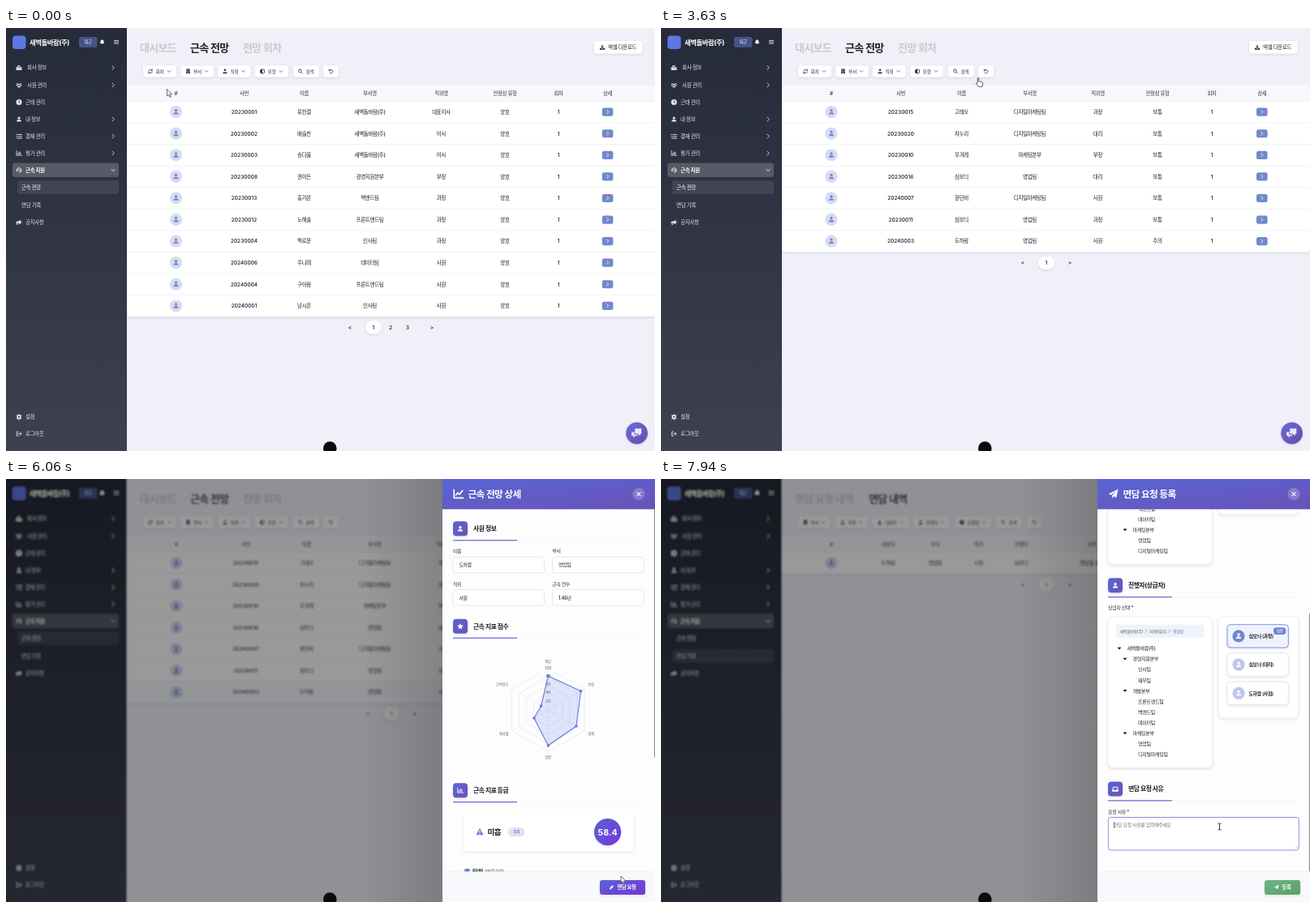
An HTML page for the animation above (8000 ms loop, 800 px wide and 522 px high).

```html
<!DOCTYPE html>
<html lang="ko">
<head>
<meta charset="utf-8">
<title>근속 전망</title>
<style>
html, body { margin: 0; width: 100%; height: 100%; overflow: hidden; background: #f0f0f9; }
svg { display: block; width: 100%; height: 100%; }
text { font-family: Inter, 'Noto Sans CJK KR', 'Noto Sans CJK', sans-serif; white-space: pre; }
</style>
</head>
<body>
<svg id="stage" viewBox="0 0 800 522" xmlns="http://www.w3.org/2000/svg"></svg>
<script>
const LOOP = 8000;
const COMPANY = '새벽돌바람(주)';
const svg = document.getElementById('stage');

// Icons on a 16 x 16 grid; a leading "~" marks a stroked icon.
const ICONS = {
  user: 'M8 1a3.6 3.6 0 1 1 0 7.2A3.6 3.6 0 0 1 8 1ZM1.5 15c0-4 2.500-5.600 6.500-5.600s6.500 1.600 6.500 5.600Z',
  users: 'M8 4a2.500 2.500 0 1 1 0 5 2.500 2.500 0 0 1 0-5ZM3 2a2 2 0 1 1 0 4 2 2 0 0 1 0-4ZM13 2a2 2 0 1 1 0 4 2 2 0 0 1 0-4ZM3.500 14c0-5 9-5 9 0ZM0 10c0-3 3-4 4.500-3v2L3 10ZM16 10c0-3-3-4-4.500-3v2l1.500 1Z',
  building: 'M2 0h12v16H9.500v-4h-3v4H2ZM4.500 3v2h2V3ZM9.500 3v2h2V3ZM4.500 7v2h2V7ZM9.500 7v2h2V7Z',
  city: 'M0 6h4V1h7v6h5v8H0ZM6 3v2h3V3ZM6 7v2h3V7ZM2 9v2h1V9ZM12 10v2h2v-2Z',
  clock: 'M8 0a8 8 0 1 1 0 16A8 8 0 0 1 8 0ZM7 3v6l4 2 1-1.500-3-1.700V3Z',
  list: '~M0 3l2 2 3-3M0 9l2 2 3-3M7 3.500h9M7 9h9M3 14h13',
  chart: '~M1 1v13h15M5 11V8M8.500 11V4M12 11V6',
  line: '~M1 1v13.500h15M4 10l3-4 3 2.500 5-6',
  headset: '~M2 10V8a6 6 0 0 1 12 0v4q0 2-5 2M3 8v4M13 8v4M6 8h4',
  horn: 'M0 5h5l8-4v12l-8-4H4l1 6H2L1 9H0ZM14 5h2v4h-2Z',
  gear: 'M6.500 0h3l.5 2.300 1.500.8 2.200-.8 1.600 2.700L13.500 7v2l1.800 2-1.600 2.700-2.200-.8-1.500.8-.5 2.300h-3L6 13.700l-1.500-.8-2.200.8L.7 11l1.800-2V7L.7 5l1.600-2.700 2.200.8L6 2.300ZM8 5.500a2.500 2.500 0 1 0 0 5 2.500 2.500 0 0 0 0-5Z',
  exit: '~M6 2H2v12h4M5.500 8H14M11 4l4 4-4 4',
  bell: 'M7 0h2v2c4 1 4 4 4 7l2 3H1l2-3c0-3 0-6 4-7ZM6 13h4q-2 4-4 0Z',
  bars: '~M1 3h14M1 8h14M1 13h14',
  down: '~M2 5l6 6 6-6',
  right: '~M5 1l7 7-7 7',
  sync: '~M2 7a6 6 0 0 1 11-2.500M14 1v4h-4M14 9a6 6 0 0 1-11 2.500M2 15v-4h4',
  undo: '~M2 1v5h5M2.500 6A6 6 0 1 1 4 13',
  half: 'M8 0a8 8 0 1 1 0 16A8 8 0 0 1 8 0ZM8 2a6 6 0 0 1 0 12Z',
  tie: 'M8 0a3 3 0 1 1 0 7 3 3 0 0 1 0-7ZM1 15q0-6 5-6l2 4 2-4q5 0 5 6Z',
  search: '~M6.500 1.500a5 5 0 1 1 0 10 5 5 0 0 1 0-10ZM10.500 10.500L15 15',
  download: 'M6.500 0h3v6H13l-5 5-5-5h3.500ZM0 11h4l4 2.500 4-2.500h4v5H0Z',
  plane: 'M16 0L13 14 8.500 11.500 6 15V10.500L13 3 4.500 9.500 0 8Z',
  pen: 'M11 1l4 4-9 9-5 1 1-5ZM10 4l2 2Z',
  star: 'M8 0l2.400 5 5.600.8-4 4 1 5.600L8 12.800 3 15.400l1-5.600-4-4L5.600 5Z',
  tray: 'M2 2h12l2 7v6H0V9ZM3.500 4L2 9h3l1 2h4l1-2h3l-1.500-5Z',
  warn: 'M8 0l8 15H0ZM7 5v5h2V5ZM7 11.500v2h2v-2Z',
  trophy: 'M4 0h8v2h4q0 6-5 7l-2 2v2h3v3H4v-3h3v-2L5 9Q0 8 0 2h4Z',
  chat: 'M5 1h10v8h-2v3l-4-3H5ZM0 6h4v4h4l2 2H6l-3 3v-3H0Z',
  caret: 'M1 4h14l-7 8Z',
  close: '~M3 3l10 10M13 3L3 13'
};

function icon(name, cx, cy, size, color, width = 2) {
  const d = ICONS[name], stroked = d[0] === '~', k = size / 16;
  const paint = stroked
    ? `fill="none" stroke="${color}" stroke-width="${width}" stroke-linecap="round" stroke-linejoin="round"`
    : `fill="${color}" fill-rule="evenodd"`;
  return `<path transform="translate(${cx - size / 2} ${cy - size / 2}) scale(${k})" d="${stroked ? d.slice(1) : d}" ${paint}/>`;
}
const rect = (x, y, w, h, r, fill, more = '') =>
  `<rect x="${x}" y="${y}" width="${w}" height="${h}" rx="${r}" fill="${fill}" ${more}/>`;
const circle = (x, y, r, fill, more = '') => `<circle cx="${x}" cy="${y}" r="${r}" fill="${fill}" ${more}/>`;
const group = (id, body, more = '') => `<g id="${id}" ${more}>${body}</g>`;
function text(x, y, str, size, fill = '#222', weight = 500, anchor = 'start') {
  const spacing = /[가-힣]/.test(str) ? -0.054 * size : 0;
  return `<text x="${x}" y="${y + size * 0.36}" font-size="${size}" fill="${fill}" font-weight="${weight}" text-anchor="${anchor}" letter-spacing="${spacing}">${str}</text>`;
}
const mid = (x, y, str, size, fill, weight) => text(x, y, str, size, fill, weight, 'middle');
const SHADOW = 'filter="url(#soft)"';

function sidebar() {
  const items = [
    ['city', 49, 26, '회사 정보', 1], ['users', 70.5, 26, '사원 관리', 1], ['clock', 91.5, 24, '근태 관리'],
    ['user', 112.5, 24, '내 정보', 1], ['list', 133.5, 24, '결재 관리', 1], ['chart', 154.5, 24, '평가 관리', 1],
    ['horn', 240, 24, '공지사항'], ['gear', 480, 24, '설정'], ['exit', 500.8, 24, '로그아웃']
  ];
  return rect(-20, -20, 169, 562, 0, 'url(#side)') +
    rect(8, 9.500, 16.5, 16.5, 4, '#5f78e0') +
    text(29, 17.5, COMPANY, 8.4, '#fff', 700) +
    rect(90, 11, 22.5, 13, 2.5, '#44538a') + mid(101.2, 17.5, '퇴근', 5.2, '#fff') +
    icon('bell', 118.5, 17.3, 6.5, '#fff') + icon('bars', 136, 17.3, 6, '#fff') +
    items.map(([name, y, x, label, open]) =>
      icon(name, 16, y, 7, '#e6e7ec') + text(x, y, label, 6.5, '#e6e7ec') +
      (open ? icon('right', 132, y, 5.5, '#e6e7ec', 2.4) : '')).join('') +
    rect(8, 166.5, 131, 17.5, 3, '#fff', 'fill-opacity=".2"') +
    icon('headset', 16, 175.3, 7, '#fff') + text(24, 175.3, '근속 지원', 6.5, '#fff', 700) +
    icon('down', 132, 175.5, 5.5, '#fff', 2.6) +
    rect(14, 188, 125, 17, 3, '#fff', 'id="sub" fill-opacity=".09"') +
    text(19, 196.5, '근속 전망', 6.5, '#fff') + text(19, 218.5, '면담 기록', 6.5, '#e6e7ec');
}

function filters(list) {
  return list.map(([x, w, name, label]) =>
    rect(x, 46.5, w, 14, 3, '#fff', SHADOW) + icon(name, label ? x + 9 : x + w / 2, 53.5, 6, '#333') +
    (label ? text(x + 15.5, 53.7, label, 5.7, '#333') : '') +
    (label && name !== 'search' ? icon('down', x + w - 9, 53.5, 5, '#333') : '')).join('');
}

function table(cols, heads, rows, detail) {
  const n = rows.length, rowH = 26.57;
  let out = rect(149, 70.5, 651, 19.7 + n * rowH, 4, '#fff', SHADOW) + rect(149, 70.5, 651, 19.5, 0, '#f7f8fc');
  heads.forEach((h, i) => out += mid(cols[i], 80.3, h, 6.4, '#333'));
  rows.forEach((row, r) => {
    const y = 103.6 + r * rowH;
    out += rect(149, y - 13.5, 651, 0.6, 0, '#e9eaf0') + circle(cols[0], y, 7.6, '#d6dcf0') +
      icon('user', cols[0], y - 0.3, 7.5, '#6f86cc');
    row.forEach((cell, i) => out += mid(cols[i + 1], y, cell, 6.5, '#1c1c22'));
    if (detail) out += rect(cols[7] - 6.8, y - 5, 13.6, 10.2, 2.5, '#7189ca') + icon('right', cols[7], y, 4.5, '#fff', 3);
  });
  return out;
}

function pager(y, xs, active) {
  const labels = ['&lt;', ...xs.slice(1, -1).map((_, i) => i + 1), '&gt;'];
  return rect(active - 10, y - 8, 20, 16, 8, '#fff', SHADOW) +
    xs.map((x, i) => mid(x, y, labels[i], 6.8, '#222')).join('');
}

const HEADS = ['#', '사번', '이름', '부서명', '직위명', '안정성 유형', '회차', '상세'];
const staff = (no, name, team, rank, state) => [no, name, team, rank, state, '1'];
const ALL = [
  staff('20230001', '유한결', COMPANY, '대표이사', '양호'),
  staff('20230002', '배슬찬', COMPANY, '이사', '양호'),
  staff('20230003', '송다올', COMPANY, '이사', '양호'),
  staff('20230008', '권이든', '경영지원본부', '부장', '양호'),
  staff('20230013', '홍가온', '백엔드팀', '과장', '양호'),
  staff('20230012', '노해솔', '프론트엔드팀', '과장', '양호'),
  staff('20230004', '백로운', '인사팀', '과장', '양호'),
  staff('20240006', '주나래', '데이터팀', '사원', '양호'),
  staff('20240004', '구아람', '프론트엔드팀', '사원', '양호'),
  staff('20240001', '남시온', '인사팀', '사원', '양호')
];
const LEAD = '심보늬', PICK = '도하람';
const FOUND = [
  staff('20230015', '고태오', '디지털마케팅팀', '과장', '보통'),
  staff('20230020', '차누리', '디지털마케팅팀', '대리', '보통'),
  staff('20230010', '우겨레', '마케팅본부', '부장', '보통'),
  staff('20230016', LEAD, '영업팀', '대리', '보통'),
  staff('20240007', '원단비', '디지털마케팅팀', '사원', '보통'),
  staff('20230011', LEAD, '영업팀', '과장', '보통'),
  staff('20240003', PICK, '영업팀', '사원', '주의')
];

const GREY = '#c9c9cf', INK = '#1f1f24';
const tabs = list => list.map(([x, label, on]) => text(x, 24, label, 13, on ? INK : GREY, 700)).join('');

function forecastPage() {
  return tabs([[165, '대시보드'], [227, '근속 전망', 1], [292, '전망 회차']]) +
    rect(725, 16, 59.5, 15.5, 3, '#fff', SHADOW) + icon('download', 735, 23.7, 6, '#222') +
    text(742, 23.8, '엑셀 다운로드', 6.5, '#222') +
    filters([[169, 41, 'sync', '회차'], [215.5, 40.5, 'building', '부서'], [261, 40.5, 'tie', '직위'],
      [307, 41, 'half', '유형'], [354, 32, 'search', '검색'], [391, 19, 'undo']]) +
    group('all', table([209.5, 293.5, 367.5, 448.5, 536.5, 615, 681, 741.6], HEADS, ALL, true) +
      pager(369.3, [424, 453, 474, 495, 525], 453)) +
    group('found', table([210, 295.5, 370.5, 454.5, 538.5, 612, 679, 740.8], HEADS, FOUND, true) +
      pager(289.8, [446, 475, 504], 475)) +
    rect(149, 0, 651, 26, 0, '#667eea', 'id="hover" fill-opacity=".06"') +
    group('menu', rect(216, 62, 65.5, 48, 2, '#fff', SHADOW) + rect(225.7, 74, 0.5, 34, 0, '#ddd') +
      icon('down', 223, 68.5, 5, '#777') + text(230, 68.5, COMPANY, 5.8) +
      ['경영지원본부', '개발본부', '마케팅본부'].map((s, i) =>
        icon('right', 236.5, 80.2 + i * 11.7, 5, '#6674c8') + text(244, 80.3 + i * 11.7, s, 5.8)).join(''));
}

function talkPage() {
  return tabs([[165, '면담 요청 내역'], [256, '면담 내역', 1]]) +
    filters([[169, 40, 'building', '부서'], [215, 40, 'tie', '직위'], [260.5, 45, 'user', '대상자'],
      [311, 45, 'tie', '진행자'], [362, 45, 'clock', '요청일'], [413, 32, 'search', '검색'], [451, 18.5, 'undo']]) +
    table([210, 280, 338, 391.5, 444, 531], ['#', '대상자', '부서', '직위', '진행자', '요청'],
      [[PICK, '영업팀', '사원', LEAD, '면담을 요청']], false) +
    pager(130.3, [446, 475, 504], 475);
}

function section(y, name, title) {
  return rect(551, y - 9, 18, 18, 4, 'url(#head)', SHADOW) + icon(name, 560, y, 7.5, '#fff') +
    text(576, y, title, 7.8, '#1f1f24', 700) +
    rect(551, y + 14.2, 236, 0.5, 0, '#ececf2') + rect(551, y + 13.8, 79, 1.2, 0, '#5f66d2');
}
const drawerHead = (name, title) =>
  rect(538, 0, 262, 37.3, 0, 'url(#head)') + icon(name, 557.5, 18.5, 12, '#fff', 2.2) +
  text(569.5, 18.7, title, 11.7, '#fff', 700) + circle(780, 18.5, 7.6, '#fff', 'fill-opacity=".22"') +
  icon('close', 780, 18.5, 6.5, '#fff', 2.6);
const drawerFoot = (x, w, fill, name, label) =>
  rect(538, 485, 262, 37, 0, '#f8f9fc') + rect(538, 484.6, 262, 0.6, 0, '#e6e7ee') +
  rect(x, 495, w, 18, 3, fill, SHADOW) + icon(name, x + 14.5, 503.8, 6, '#fff') +
  text(x + 21.5, 503.9, label, 6.3, '#fff', 700);

// Radar geometry
const CX = 668.3, CY = 285, RADIUS = 51.5;
const spoke = (i, r) => [CX + r * Math.sin(i * Math.PI / 3), CY - r * Math.cos(i * Math.PI / 3)];
const GOAL = [42, 46.5, 40, 44, 20, 10].map((r, i) => spoke(i, r));

function radar() {
  let out = '';
  for (let k = 1; k <= 5; k++)
    out += `<polygon points="${GOAL.map((_, i) => spoke(i, RADIUS * k / 5)).join(' ')}" fill="none" stroke="#dfdfe4" stroke-width=".5"/>`;
  GOAL.forEach((_, i) => {
    const [x, y] = spoke(i, RADIUS);
    out += `<path d="M${CX} ${CY}L${x} ${y}" stroke="#e4e4e8" stroke-width=".5"/>`;
  });
  for (let k = 1; k <= 5; k++) {
    const y = CY - RADIUS * k / 5 - 0.8;
    out += rect(CX - 4, y - 3, 8, 6, 0, '#fff', 'fill-opacity=".75"') + mid(CX, y, k * 20, 5, '#555', 400);
  }
  [['직무', 668, 225], ['보상', 721, 253], ['관계', 721, 314.5], ['성장', 668, 343], ['워라밸', 613.5, 314.5], ['근속연수', 611.5, 253]]
    .forEach(([s, x, y]) => out += mid(x, y, s, 4.4, '#666', 400));
  return out + '<polygon id="area" fill="#667eea" fill-opacity=".2" stroke="#5f78d8" stroke-width="1.1" stroke-linejoin="round"/>' +
    GOAL.map(() => circle(0, 0, 1.7, '#5f78d8', 'class="dot"')).join('');
}

function detailDrawer() {
  const field = (x, y, label, value) => text(x, y, label, 5.9, '#333') +
    rect(x, y + 7, 112.5, 19.5, 3, '#fff', 'stroke="#dddde3" stroke-width=".7"') + text(x + 7.5, y + 17, value, 5.9, '#222');
  const body = section(61.3, 'user', '사원 정보') +
    field(551, 89.3, '이름', PICK) + field(673.5, 89.3, '부서', '영업팀') +
    field(551, 129.6, '직위', '사원') + field(673.5, 129.6, '근속 연수', '1.46년') +
    section(181.8, 'star', '근속 지표 점수') + radar() + section(384.3, 'chart', '근속 지표 등급') +
    rect(564, 412, 209.5, 47.5, 5, '#fff', SHADOW) + icon('warn', 584, 435.3, 9, '#6480d4') +
    text(593.5, 435.6, '미흡', 9.6, INK, 700) + rect(619, 430, 20.5, 11.3, 5.6, '#dfe3f6') +
    mid(629.3, 435.7, '주의', 4.8, '#4454a8') + circle(741.6, 435.6, 16.6, 'url(#btn)', SHADOW) +
    mid(741.6, 435.8, '58.4', 10.6, '#fff', 700) +
    icon('trophy', 568.5, 484.5, 7.5, '#6480d4') + text(575, 484.5, '탁월', 7.4, INK, 700) +
    text(590, 484.5, '(90점 이상)', 5.2, '#555');
  return rect(538, 0, 262, 522, 0, '#fdfdfe') + `<g clip-path="url(#body)">${body}</g>` +
    drawerHead('line', '근속 전망 상세') + drawerFoot(732, 56, 'url(#btn)', 'pen', '면담 요청') +
    rect(798.9, 37, 1.1, 306.5, 0.5, '#8b8b93');
}

function picker(dy, title, label, chosen) {
  const crumb = '#666';
  const tree = [COMPANY, '경영지원본부', ' 인사팀', ' 재무팀', '개발본부', ' 프론트엔드팀', ' 백엔드팀', ' 데이터팀', '마케팅본부', ' 영업팀', ' 디지털마케팅팀'];
  let out = section(61.3, 'user', title) + text(551, 89.3, label, 6, '#333') +
    rect(551, 100, 128.7, 186.5, 6, '#fff', `stroke="#e8e8ef" stroke-width=".7" ${SHADOW}`) +
    rect(561, 109.7, 108.7, 16, 2, '#f0f2fb') + text(565.5, 117.8, COMPANY, 4.9, crumb, 400) +
    icon('right', 597.8, 117.8, 4, crumb) + text(602, 117.8, '마케팅본부', 4.9, crumb, 400) +
    icon('right', 626.7, 117.8, 4, crumb) + text(631, 117.8, '영업팀', 4.9, '#5a6fcf');
  tree.forEach((name, i) => {
    const y = 139 + i * 13.12, leaf = name[0] === ' ', x = i === 0 ? 565 : 572;
    out += (leaf ? '' : icon('caret', x, y, 5.5, '#111')) + text(leaf ? 588 : x + 9.5, y, name.trim(), 6.05, '#222');
  });
  out += rect(687, 100, 98.7, 125, 6, '#fff', `stroke="#e8e8ef" stroke-width=".7" ${SHADOW}`);
  [[LEAD, '과장'], [LEAD, '대리'], [PICK, '사원']].forEach(([name, rank], i) => {
    const y = 123.9 + i * 35.2, on = i === chosen;
    out += rect(698, y - 14.2, 75.3, 28.4, 4, on ? '#f0f3fe' : '#fff',
      `stroke="${on ? '#7587dc' : i ? '#e3e5f0' : '#cfd5ec'}" stroke-width=".9" ${SHADOW}`) +
      circle(712, y, 7.6, i ? '#bcc7ea' : '#7188cd') + icon('user', 712, y - 0.3, 7.5, '#fff') +
      text(724.5, y + 0.2, `${name} (${rank})`, 5.9, '#222', 600) +
      (i ? '' : rect(755, 113.3, 15.3, 8.8, 3.5, '#6f86cc') + mid(762.7, 117.7, '팀장', 4.4, '#fff'));
  });
  return `<g transform="translate(0 ${dy})">${out}</g>`;
}

function requestDrawer() {
  const body = picker(0, '면담 대상자', '대상자 선택 *', 2) + rect(687, 285.2, 92, 1.7, 0.8, '#5d63cf', 'id="bar"') +
    picker(251, '진행자(상급자)', '상급자 선택 *', 0) +
    section(563.5, 'tray', '면담 요청 사유') + text(551, 591.5, '요청 사유 *', 6, '#333') +
    rect(551.3, 598.5, 235, 40.5, 3, '#fff', 'id="area2" stroke="#dddde3" stroke-width=".8"') +
    '<path d="M782 637.500l3-3M784 637.500l1-1" stroke="#888" stroke-width=".5"/>' +
    text(558, 608, '면담 요청 사유를 입력해주세요', 5.9, '#777', 400) + rect(558, 604, 0.6, 8, 0, '#222', 'id="caret"');
  return rect(538, 0, 262, 522, 0, '#fdfdfe') + `<g clip-path="url(#body)">${group('scroll', body)}</g>` +
    drawerHead('plane', '면담 요청 등록') + drawerFoot(744, 44, 'url(#ok)', 'plane', '등록') +
    rect(798.9, 37, 1.1, 318, 0.5, '#8b8b93', 'id="thumb"');
}

const gradient = (id, from, to, dir = 'x2="1" y2="1"') =>
  `<linearGradient id="${id}" ${dir}><stop stop-color="${from}"/><stop offset="1" stop-color="${to}"/></linearGradient>`;
const HAND = 'M-.6 .6q.8-1 1.600 0V4.500l3.600.9q1.400.4 1.200 1.800l-.7 3.800H.3L-2.500 7.200q0-1.200 1.300-.8l.6.5Z';

svg.innerHTML = '<defs>' + gradient('side', '#252a38', '#3d4151', 'x2="0" y2="1"') +
  gradient('head', '#5866d4', '#6a52b8') + gradient('btn', '#5a62d4', '#7436da') +
  gradient('ok', '#6cb583', '#5c9f66') + gradient('fab', '#6470d6', '#6a48ac') +
  '<linearGradient id="edge"><stop stop-opacity="0"/><stop offset="1" stop-opacity=".14"/></linearGradient>' +
  '<filter id="soft" x="-20%" y="-30%" width="140%" height="170%"><feDropShadow dx="0" dy="1.2" stdDeviation="1.6" flood-color="#30365c" flood-opacity=".13"/></filter>' +
  '<filter id="blur" filterUnits="userSpaceOnUse" x="-20" y="-20" width="840" height="562"><feGaussianBlur stdDeviation="1.2"/></filter>' +
  '<clipPath id="body"><rect x="538" y="37" width="262" height="447.800"/></clipPath></defs>' +
  group('page', rect(-20, -20, 840, 562, 0, '#f0f0f9') + group('forecast', forecastPage()) + group('talk', talkPage()) +
    sidebar() + circle(777.6, 500, 13.4, 'url(#fab)', SHADOW) + icon('chat', 777.6, 500, 13, '#e8e6fa')) +
  group('shade', rect(0, 0, 800, 522, 0, '#000', 'fill-opacity=".4"') + rect(440, 0, 98, 522, 0, 'url(#edge)')) +
  group('detail', detailDrawer()) + group('request', requestDrawer()) +
  circle(399.3, 518.5, 8.3, '#0b0b0d') +
  group('cursor', '<path id="arrow" d="M0 0V8.500L2 6.700 3.400 10 4.800 9.400 3.400 6.200H6Z" fill="#fff" stroke="#333" stroke-width=".7" stroke-linejoin="round"/>' +
    `<path id="hand" d="${HAND}" fill="#fff" stroke="#333" stroke-width=".8" stroke-linejoin="round"/>` +
    '<path id="beam" d="M-2-4Q0-4 0-3Q0-4 2-4M0-3V3M-2 4Q0 4 0 3Q0 4 2 4" fill="none" stroke="#222" stroke-width=".9"/>');

const el = {};
svg.querySelectorAll('[id]').forEach(node => el[node.id] = node);
const dots = svg.querySelectorAll('.dot');
const cache = {};
function set(id, name, value) {
  const key = id + name;
  if (cache[key] !== value) el[id].setAttribute(name, cache[key] = value);
}
const show = (id, on) => set(id, 'display', on ? 'inline' : 'none');

const clamp = v => Math.max(0, Math.min(1, v));
const span = (t, from, to) => clamp((t - from) / (to - from));
const smooth = p => p * p * (3 - 2 * p);
const outCubic = p => 1 - (1 - p) ** 3;
const outQuart = p => 1 - (1 - p) ** 4;

// Event times and pointer track
const MENU_ON = 1000, MENU_OFF = 2200, SEARCH = 3150, OPEN = 4720, SWAP = 6440, SCROLL = 7200, FOCUS = 7780;
const PATH = [[100, 198.5, 75.5], [750, 252.5, 50], [1650, 252.5, 50], [2050, 256, 100], [2350, 256, 100], [2950, 371, 50],
  [3500, 371, 50], [4430, 740, 259.3], [5500, 740, 259.3], [6060, 758, 490], [6220, 760, 501], [6550, 760, 501],
  [7000, 713.5, 408.5], [7200, 713.5, 408.5], [7650, 688.5, 429]];
const KINDS = [[0, 'arrow'], [620, 'hand'], [2500, 'arrow'], [2850, 'hand'], [3670, 'arrow'], [4330, 'hand'], [4780, 'arrow'],
  [6090, 'hand'], [6620, 'arrow'], [6930, 'hand'], [7230, 'arrow'], [7600, 'beam']];

function pointer(t) {
  const i = PATH.findIndex(p => p[0] > t);
  if (i === 0) return PATH[0].slice(1);
  if (i < 0) return PATH[PATH.length - 1].slice(1);
  const a = PATH[i - 1], b = PATH[i], k = smooth(span(t, a[0], b[0]));
  return [a[1] + (b[1] - a[1]) * k, a[2] + (b[2] - a[2]) * k];
}

function drawRadar(t) {
  const k = outQuart(span(t, 4909, 5909));
  const pts = GOAL.map(([x, y], i) => [i % 3 ? 642 + (x - 642) * k : x, 270 + (y - 270) * k]);
  set('area', 'points', pts.map(p => p.map(v => v.toFixed(2))).join(' '));
  dots.forEach((dot, i) => {
    dot.setAttribute('cx', pts[i][0]);
    dot.setAttribute('cy', pts[i][1]);
  });
}

function render(t) {
  const slide = outCubic(span(t, OPEN, OPEN + 190)), swapped = t >= SWAP;
  show('forecast', !swapped);
  show('talk', swapped);
  set('sub', 'y', swapped ? 210 : 188);
  show('all', t < SEARCH);
  show('found', t >= SEARCH);
  show('menu', t >= MENU_ON && t < MENU_OFF);

  const row = Math.floor((pointer(Math.min(t, OPEN))[1] - 90.3) / 26.57);
  show('hover', t > SEARCH && row >= 0);
  set('hover', 'y', 90.3 + Math.max(0, row) * 26.57);

  set('page', 'filter', slide > 0 ? 'url(#blur)' : 'none');
  show('shade', slide > 0);
  set('shade', 'opacity', slide);
  show('detail', slide > 0 && !swapped);
  set('detail', 'transform', `translate(${262 * (1 - slide)} 0)`);
  show('request', swapped);
  drawRadar(t);

  const scroll = 181 * smooth(span(t, SCROLL, SCROLL + 420));
  set('scroll', 'transform', `translate(0 ${-scroll})`);
  set('thumb', 'y', 37 + scroll * 129 / 181);
  show('bar', t < SCROLL);
  set('area2', 'stroke', t >= FOCUS ? '#6f76dc' : '#dddde3');
  show('caret', t >= FOCUS);

  const [x, y] = pointer(t);
  set('cursor', 'transform', `translate(${x} ${y})`);
  const kind = KINDS.filter(k => k[0] <= t).pop()[1];
  ['arrow', 'hand', 'beam'].forEach(id => show(id, id === kind));
}

const start = performance.now();
function tick() {
  render((performance.now() - start) % LOOP);
  requestAnimationFrame(tick);
}
tick();
</script>
</body>
</html>
```
